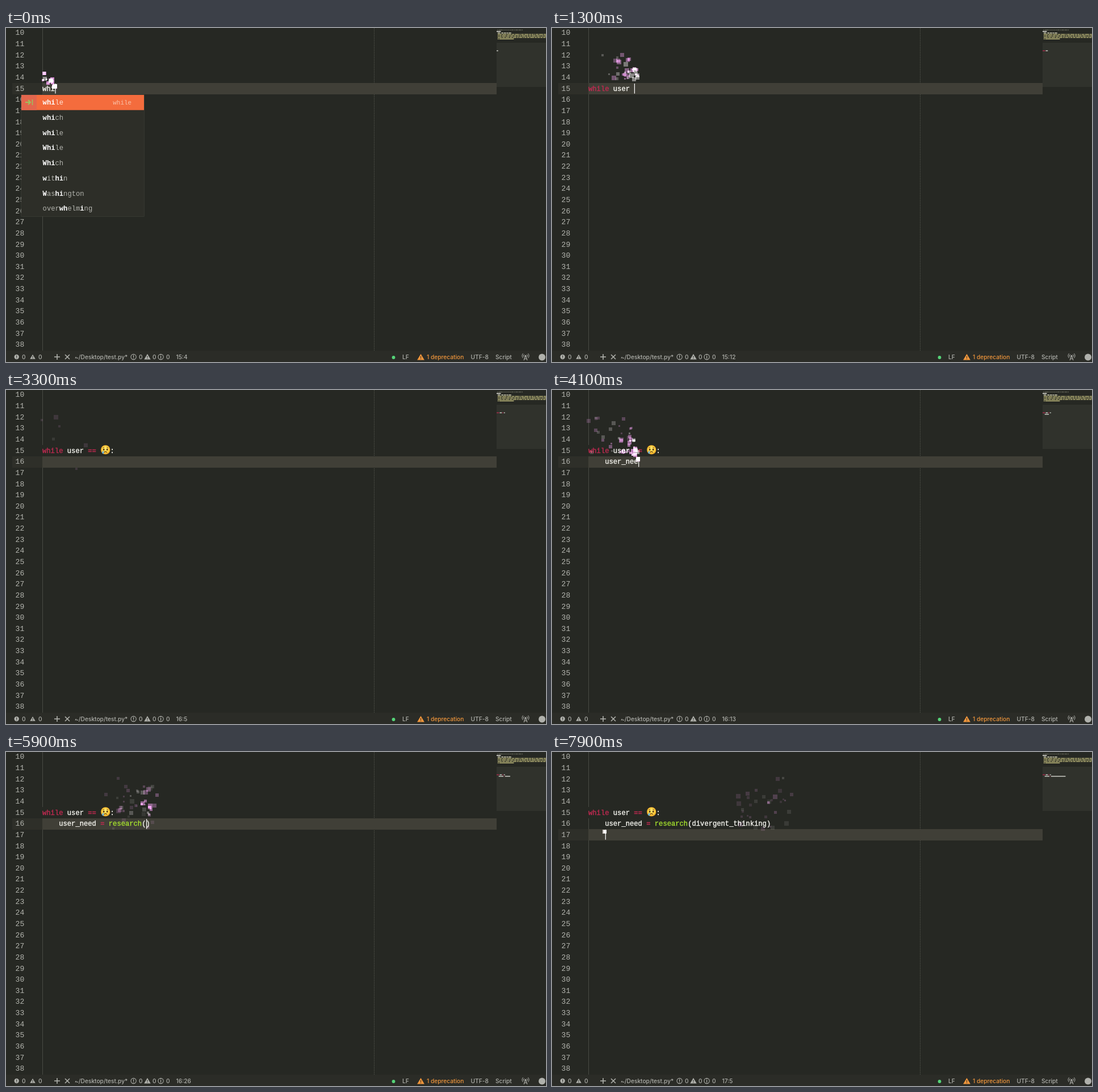
An HTML page with a canvas that plays this animation: 951 px wide and 589 px high, repeating every 8000 ms.

```html
<!DOCTYPE html>
<html lang="en">
<head>
<meta charset="utf-8">
<title>Typing</title>
<style>
html, body { margin: 0; width: 100%; height: 100%; overflow: hidden; background: #262823; }
canvas { display: block; width: 951px; height: 589px; }
</style>
</head>
<body>
<canvas id="stage"></canvas>
<script>
const W = 951, H = 589, LOOP = 8000;
const LINE = 19.64, CHAR = 7.3, LEFT = 64, EMOJI = '\u2639', EMOJI_W = 17.4;
const MONO = '"Liberation Mono", monospace';
const SANS = 'Inter, "Open Sans", sans-serif';
const CODE = '12.17px ' + MONO;
const RED = '#c42a52', WHITE = '#f8f8f2', GREY = '#b2b3ad';

const canvas = document.getElementById('stage');
const dpr = window.devicePixelRatio || 1;
canvas.width = W * dpr;
canvas.height = H * dpr;
const c = canvas.getContext('2d');

function rect(x, y, w, h, color) {
  c.fillStyle = color;
  c.fillRect(x, y, w, h);
}

function text(s, x, y, color, font, align = 'left') {
  c.font = font;
  c.fillStyle = color;
  c.textAlign = align;
  c.textBaseline = 'alphabetic';
  c.fillText(s, x, y);
}

// Text slightly heavier than the regular weight
function heavyText(s, x, y, color, font, align) {
  text(s, x, y, color, font, align);
  c.strokeStyle = color;
  c.lineWidth = 0.35;
  c.strokeText(s, x, y);
}

function disc(x, y, r, color) {
  c.fillStyle = color;
  c.beginPath();
  c.arc(x, y, r, 0, Math.PI * 2);
  c.fill();
}

function stroke(points, color, width) {
  c.strokeStyle = color;
  c.lineWidth = width;
  c.beginPath();
  points.forEach(([x, y], i) => i ? c.lineTo(x, y) : c.moveTo(x, y));
  c.stroke();
}

function random(seed) {
  let s = seed * 7919 + 17;
  return () => {
    s = (s + 0x6D2B79F5) | 0;
    let v = Math.imul(s ^ (s >>> 15), 1 | s);
    v = (v + Math.imul(v ^ (v >>> 7), 61 | v)) ^ v;
    return ((v ^ (v >>> 14)) >>> 0) / 4294967296;
  };
}

const lineTop = row => 97.2 + (row - 15) * LINE;
const baseline = row => lineTop(row) + 13.6;
const width = s => [...s].reduce((w, ch) => w + (ch === EMOJI ? EMOJI_W : CHAR), 0);

// Key presses: each stores the line up to the caret and the auto-closed bracket after it.
const keys = [];
const lines = { 15: '', 16: '    ', 17: '    ' };
let closing = '';

function type(row, start, step, chars) {
  [...chars].forEach((ch, i) => {
    lines[row] += ch;
    if (ch === '(') closing = ')';
    if (ch === ')') closing = '';
    press(row, start + i * step);
  });
}

function press(row, t) {
  keys.push({ t, row, line: lines[row], closing, x: LEFT + width(lines[row]) });
}

type(15, -135, 60, 'whi');
type(15, 90, 80, 'le ');
type(15, 850, 70, 'user ');
type(15, 1380, 60, '== ');
type(15, 2120, 150, EMOJI + ':');
press(16, 2450);
type(16, 3480, 85, 'user_need ');
type(16, 4350, 110, '= ');
type(16, 4645, 120, 'res');
type(16, 5010, 110, 'earch');
type(16, 5650, 0, '(');
type(16, 5960, 70, 'divergent');
type(16, 6740, 52, '_thinking');
type(16, 7280, 0, ')');
press(17, 7870);

const sparks = keys.flatMap((key, i) => {
  const rnd = random(i + 5);
  return Array.from({ length: 6 + Math.floor(rnd() * 4) }, () => ({
    t: key.t, x: key.x, y: lineTop(key.row) + 8,
    vx: rnd() * 2 - 1, vy: -1.5 - rnd() * 2,
    size: 2.5 + rnd() * 5.5,
    rgb: rnd() < 0.65 ? '196,116,198' : '150,145,150'
  }));
});

function drawSparks(t) {
  c.globalCompositeOperation = 'lighter';
  for (const p of sparks) {
    const n = (t - p.t) * 0.06;
    const alpha = 0.96 ** n;
    if (n < 0 || alpha < 0.1) continue;
    const x = p.x + p.vx * n, y = p.y + p.vy * n + 0.0375 * n * n;
    rect(Math.round(x - p.size / 2), Math.round(y - p.size / 2),
      Math.round(p.size), Math.round(p.size), `rgba(${p.rgb},${alpha})`);
  }
  c.globalCompositeOperation = 'source-over';
}

function drawEmoji(x, y) {
  const g = c.createRadialGradient(x, y - 3, 1, x, y, 8.3);
  g.addColorStop(0, '#ffe36a');
  g.addColorStop(0.7, '#fccf3c');
  g.addColorStop(1, '#e59a25');
  disc(x, y, 8.2, g);
  for (const side of [-1, 1]) {
    c.fillStyle = '#4d2c12';
    c.beginPath();
    c.ellipse(x + side * 3, y - 0.4, 1.3, 1.8, 0, 0, 7);
    c.fill();
    stroke([[x + side * 2, y - 4.6], [x + side * 5, y - 3.4]], '#7a4a1a', 0.9);
  }
  c.strokeStyle = '#5a3010';
  c.lineWidth = 1.1;
  c.beginPath();
  c.arc(x, y + 6, 2.6, Math.PI * 1.15, Math.PI * 1.85);
  c.stroke();
  c.fillStyle = '#5cb4ec';
  c.beginPath();
  c.moveTo(x - 4.2, y + 1.4);
  c.quadraticCurveTo(x - 7.6, y + 6.6, x - 4.2, y + 7);
  c.quadraticCurveTo(x - 1.4, y + 6.6, x - 4.2, y + 1.4);
  c.fill();
}

function tokenColor(word) {
  return word === 'while' || /^=+$/.test(word) ? RED : WHITE;
}

function drawCode(row, line) {
  let x = LEFT;
  const y = baseline(row);
  for (const part of line.match(/\s+|research(?=\()|\w+|=+|./gu) || []) {
    if (part === EMOJI) {
      drawEmoji(x + 9, y - 5.4);
    } else if (part.trim()) {
      const color = part === 'research' && line.includes('(') ? '#a6e22e' : tokenColor(part);
      heavyText(part, x, y, color, CODE);
    }
    x += width(part);
  }
}

// Minimap
const MAP_X = 864, MAP_CH = 0.92;
const mapY = row => 39.4 + (row - 15) * 2.62;

function mapLine(row, line, color) {
  c.globalAlpha = color ? 1 : 0.72;
  for (const m of line.matchAll(/\S+/g)) {
    rect(MAP_X + m.index * MAP_CH, mapY(row), m[0].length * MAP_CH, 1.6, color || tokenColor(m[0]));
  }
  c.globalAlpha = 1;
}

function filler(seed, from, to) {
  const rnd = random(seed);
  let s = ' '.repeat(from);
  while (s.length < to) s += 'x'.repeat(2 + Math.floor(rnd() * 7)) + ' ';
  return s.slice(0, to);
}

const header = [
  [filler(1, 1, 50), '#5b5c50'],
  ['xxxxxxxx', '#dcdcd4'],
  ['  xxxxx  xxxx xxxx xxx xxxxx', '#c9c8ae'],
  [filler(4, 2, 95), '#b7b277'],
  [filler(5, 2, 95), '#b7b277'],
  [filler(6, 2, 95), '#b7b277'],
  ['  xx xxxxxxxxxxxxxxxxxxxxxxxxxxxx', '#b7b277']
];

// Autocomplete lists: "icon:label"
const lists = {
  whi: { items: ':while :which :while :While :Which :within :Washington :overwhelming', snippet: 'while' },
  abs: {
    items: 'b:abs b:all b:any b:ArithmeticError b:ascii b:AssertionError b:AttributeError k:await b:BaseException b:bin',
    doc: ['Return the absolute value of the', 'argument.']
  },
  res: {
    items: 'b:ResourceWarning b:reversed b:RecursionError :result :results :research :results_ :responses :researcher :researchers',
    doc: ['Base class for warnings about resource', 'usage.']
  }
};

function matches(label, word) {
  const hit = [];
  let from = 0;
  for (const ch of word) {
    const i = label.toLowerCase().indexOf(ch, from);
    if (i < 0) return null;
    hit.push(i);
    from = i + 1;
  }
  return hit;
}

function drawPopup({ items, doc, snippet }, wordX, row, word) {
  const rows = items.split(' ').map(s => {
    const [icon, label] = s.split(':');
    return { icon, label, hit: matches(label, word) };
  }).filter(r => r.hit);
  const x = Math.round(wordX - 37), y = lineTop(row) + 20.8, step = 26.75, w = 216;
  const h = rows.length * step + (doc ? 36 : 0);
  rect(x - 0.5, y - 0.5, w + 1, h + 1, '#464841');
  rect(x, y, w, h, '#2d2e28');
  if (doc) rect(x, y + rows.length * step, w, 36, '#262823');
  rows.forEach((r, i) => {
    const top = y + i * step, base = top + 17.2;
    if (!i) rect(x, top, w, step, '#f46c3d');
    if (r.icon) {
      rect(x, top, 27, step, i ? '#51334f' : '#e5645b');
      text(r.icon, x + 13.5, base - 0.6, i ? '#9c5c98' : '#7c2c72', 'bold 11px ' + MONO, 'center');
    } else if (!i) {
      rect(x, top, 27, step, '#e2664d');
      drawArrow(x + 7, top + 13);
    }
    [...r.label].forEach((ch, k) => {
      const bold = r.hit.includes(k);
      const color = bold ? '#ffffff' : i ? GREY : '#ffe3d6';
      text(ch, wordX + 0.6 + k * CHAR, base, color, (bold ? 'bold ' : '') + CODE);
    });
    if (!i && snippet) text(snippet, x + 194, base, '#f9c3aa', '10.9px ' + MONO, 'right');
  });
  if (doc) doc.forEach((s, i) =>
    text(s, x + 8.3, y + rows.length * step + 15.2 + i * 13.4, GREY, '10.9px ' + SANS));
}

function drawArrow(x, y) {
  const green = '#9cc25c';
  stroke([[x, y], [x + 8, y]], green, 2);
  stroke([[x + 5, y - 4], [x + 9, y], [x + 5, y + 4]], green, 2);
  stroke([[x + 12.5, y - 5], [x + 12.5, y + 5]], green, 1.6);
}

// Status bar
function triangle(x, y, r, color) {
  c.fillStyle = color;
  c.beginPath();
  c.moveTo(x, y - r);
  c.lineTo(x + r * 1.1, y + r * 0.85);
  c.lineTo(x - r * 1.1, y + r * 0.85);
  c.fill();
  rect(x - 0.6, y - r * 0.3, 1.2, r * 0.5, '#2a2b26');
  rect(x - 0.6, y + r * 0.4, 1.2, 1.1, '#2a2b26');
}

function ring(x, y, mark, color) {
  c.strokeStyle = color;
  c.lineWidth = 1.1;
  c.beginPath();
  c.arc(x, y, 4.6, 0, 7);
  c.stroke();
  text(mark, x, y + 2.8, color, 'bold 8px ' + SANS, 'center');
}

function antenna(x, y, color) {
  stroke([[x - 3, y + 6], [x, y - 2], [x + 3, y + 6]], color, 1.1);
  stroke([[x - 2, y + 3.4], [x + 2, y + 3.4]], color, 1);
  disc(x, y - 2, 1.3, color);
  for (const r of [3.4, 6]) {
    for (const a of [0, Math.PI]) {
      c.lineWidth = 1;
      c.beginPath();
      c.arc(x, y - 2, r, a - 0.75, a + 0.75);
      c.stroke();
    }
  }
}

function drawStatus(position) {
  const y = 580, color = '#b0b1ac', orange = '#f0963c';
  const label = (s, x, col = color) => text(s, x, y + 4, col, '500 10.2px ' + SANS);
  rect(0, 569, W, 20, '#2b2c27');
  disc(18.7, y, 4.2, color);
  rect(18.1, y - 2.5, 1.2, 3, '#2b2c27');
  rect(18.1, y + 1.3, 1.2, 1.2, '#2b2c27');
  label('0', 28);
  triangle(47, y, 4.3, color);
  label('0', 57);
  stroke([[85, y], [95, y]], color, 1.6);
  stroke([[90, y - 5], [90, y + 5]], color, 1.6);
  stroke([[104, y - 4], [112, y + 4]], color, 1.6);
  stroke([[112, y - 4], [104, y + 4]], color, 1.6);
  label('~/Desktop/test.py*', 121);
  ring(224.6, y, '!', color);
  label('0', 234);
  triangle(249, y, 5.2, color);
  label('0', 258);
  ring(272.6, y, 'i', color);
  label('0', 282);
  label(position, 299.5);
  disc(682.5, y + 1, 2.9, '#55d478');
  label('LF', 698);
  triangle(730.5, y + 0.6, 5.8, orange);
  label('1 deprecation', 741, orange);
  label('UTF-8', 818.5);
  label('Script', 862);
  antenna(915, y, color);
  disc(944, y + 0.5, 6, color);
}

function draw(t) {
  const done = keys.filter(k => k.t <= t);
  const last = done[done.length - 1];
  const content = {};
  for (const k of done) content[k.row] = k.line + k.closing;

  c.setTransform(dpr, 0, 0, dpr, 0, 0);
  rect(0, 0, W, H, '#262823');

  rect(64, 0, 1, 569, '#484a44');
  c.setLineDash([2, 1]);
  stroke([[648.5, 0], [648.5, 569]], '#484a44', 1);
  c.setLineDash([]);
  rect(63, 97, 3, 20, '#262823');
  const top = Math.round(lineTop(last.row));
  rect(11, top, 53, 20, '#2e2f29');
  rect(64, top, 800, 20, '#403f37');

  for (let n = 10; n <= 38; n++) text(n, 32.2, baseline(n) - 0.2, '#b4b5af', '13px ' + MONO, 'right');

  rect(MAP_X, 26, W - MAP_X, 78, '#30322c');
  header.forEach(([s, color], i) => mapLine(i + 1, s, color));
  for (const row in content) {
    drawCode(+row, content[row]);
    mapLine(+row, content[row]);
  }

  // The caret stays lit after a key press, then blinks.
  const age = t - last.t;
  if (age % 1000 < 520) rect(last.x + 0.5, top + 1, 1.2, LINE - 2, '#ffffff');

  drawSparks(t);

  const line = last.line;
  if (/^while?$|^whi$/.test(line)) drawPopup(lists.whi, LEFT, 15, line);
  else if (line === 'while ' && age > 90) drawPopup(lists.abs, LEFT + 6 * CHAR, 15, '');
  else if (/= res\w*$/.test(line)) drawPopup(lists.res, LEFT + 16 * CHAR, 16, line.slice(16));

  drawStatus(last.row + ':' + (line.length + 1));
}

function frame() {
  // Stepped clock: ten pictures a second.
  draw(Math.floor((performance.now() % LOOP) / 100) * 100);
  requestAnimationFrame(frame);
}
frame();
</script>
</body>
</html>
```
